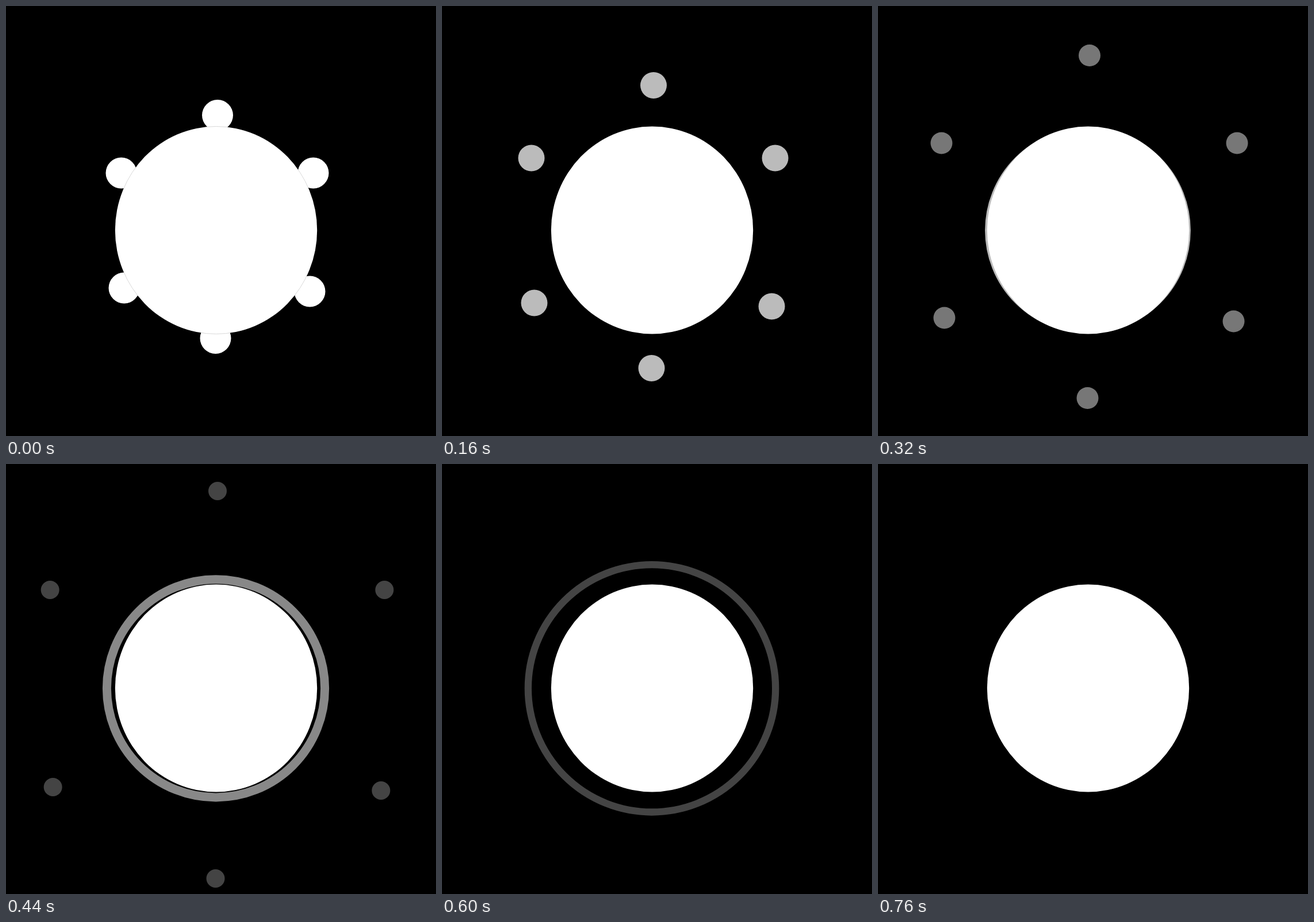
An HTML page with a canvas that plays this animation: 748x748 px, repeating every 2 s.

```html
<!DOCTYPE html>
<html lang="en">
<head>
<meta charset="utf-8">
<title>Burst</title>
<style>
  html, body { margin: 0; width: 100%; height: 100%; overflow: hidden; background: #000; }
  canvas { display: block; }
</style>
</head>
<body>
<canvas id="stage" width="748" height="748"></canvas>
<script>
const ctx = document.getElementById('stage').getContext('2d');
const LOOP = 2000, STEP = 40, FADE = 15;

// start x, start y, heading in degrees
const dots = [
  [368, 190, -90], [534.5, 290.5, -30], [528.5, 496.5, 30],
  [364.5, 578, 90], [205.5, 490.5, 150], [200.5, 290.5, -150]
];

const white = a => `rgba(255,255,255,${a})`;

function disc() {
  ctx.beginPath();
  ctx.ellipse(365.5, 390, 175.7, 180.5, 0, 0, 2 * Math.PI);
}

function dotPath(step) {
  ctx.beginPath();
  for (const [x, y, deg] of dots) {
    const a = deg * Math.PI / 180, r = 27 - step;
    const cx = x + 13 * step * Math.cos(a);
    const cy = y + 13 * step * Math.sin(a);
    ctx.moveTo(cx + r, cy);
    ctx.arc(cx, cy, r, 0, 2 * Math.PI);
  }
}

function drawRing(step) {
  const n = step - 4;
  if (n < 0 || n >= FADE) return;
  ctx.beginPath();
  ctx.arc(365, 390.3, 144.8 + 6.4 * n, 0, 2 * Math.PI);
  ctx.lineWidth = 19.7 - 0.67 * n;
  ctx.strokeStyle = white(1 - n / FADE);
  ctx.stroke();
}

function draw(step) {
  ctx.fillStyle = '#000';
  ctx.fillRect(0, 0, 748, 748);

  const live = step < FADE;
  if (live) {
    dotPath(step);
    ctx.fillStyle = white(1 - step / FADE);
    ctx.fill();
  }
  drawRing(step);

  disc();
  ctx.fillStyle = '#fff';
  ctx.fill();

  // faint seam where the dots touch the disc
  if (live) {
    ctx.save();
    dotPath(step);
    ctx.clip();
    disc();
    ctx.lineWidth = 1;
    ctx.strokeStyle = '#d8d8d8';
    ctx.stroke();
    ctx.restore();
  }
}

function tick() {
  draw(Math.floor(performance.now() % LOOP / STEP));
  requestAnimationFrame(tick);
}
tick();
</script>
</body>
</html>
```
